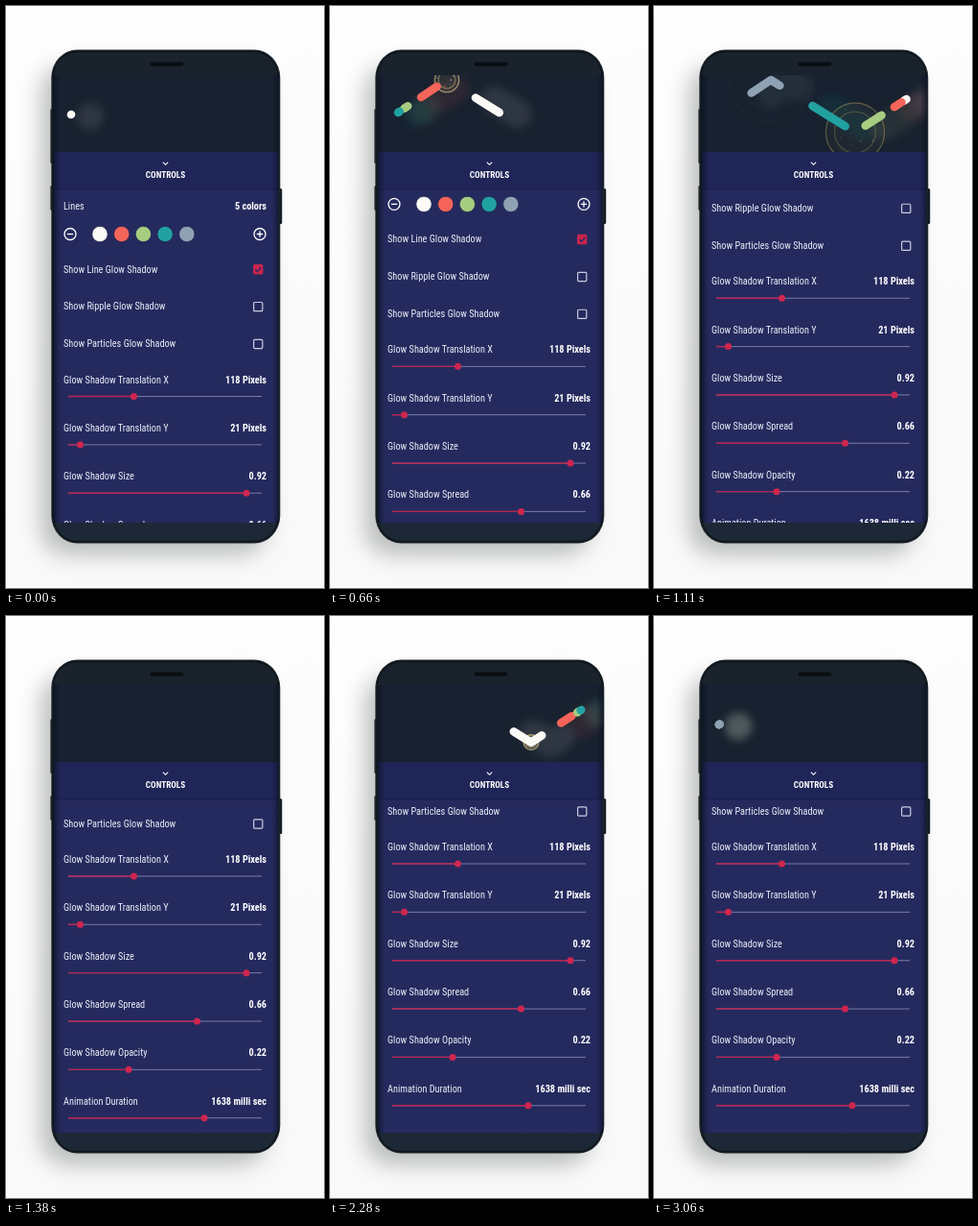
Recreate the animation shown at these times as an HTML page. Size 332 by 606 pixels, loop 3.09 s.

```html
<!DOCTYPE html>
<html lang="en">
<head>
<meta charset="utf-8">
<title>Line animation controls</title>
<style>
  html, body { margin: 0; width: 100%; height: 100%; overflow: hidden; background: #fafbfa; }
  svg { display: block; width: 332px; height: 606px; }
  text {
    font: 400 10.25px "Roboto Condensed", Roboto, sans-serif;
    font-stretch: 75%;
    fill: #eceef8;
  }
  .bold { font-weight: 700; fill: #fff; }
  .wide text { letter-spacing: -.055em; }
</style>
</head>
<body>
<svg id="stage" viewBox="0 0 332 606" xmlns="http://www.w3.org/2000/svg">
  <defs>
    <linearGradient id="wall" x1="0" y1="0" x2=".2" y2="1">
      <stop offset="0" stop-color="#fdfefd"/>
      <stop offset="1" stop-color="#f8f9f8"/>
    </linearGradient>
    <linearGradient id="body" x1="0" y1="0" x2="0" y2="1">
      <stop offset="0" stop-color="#1a232c"/>
      <stop offset=".5" stop-color="#182130"/>
      <stop offset="1" stop-color="#1d2837"/>
    </linearGradient>
    <linearGradient id="edge">
      <stop offset="0" stop-color="#0d1324" stop-opacity=".7"/>
      <stop offset=".03" stop-color="#0d1324" stop-opacity="0"/>
      <stop offset=".97" stop-color="#0d1324" stop-opacity="0"/>
      <stop offset="1" stop-color="#0d1324" stop-opacity=".7"/>
    </linearGradient>
    <filter id="soft" x="-40%" y="-20%" width="180%" height="140%"><feGaussianBlur stdDeviation="11"/></filter>
    <filter id="blur" filterUnits="userSpaceOnUse" x="0" y="30" width="332" height="170"><feGaussianBlur stdDeviation="4.5"/></filter>
    <clipPath id="sky"><rect x="50" y="72" width="235" height="80"/></clipPath>
    <clipPath id="pane"><rect x="50" y="191" width="235" height="347"/></clipPath>
  </defs>

  <rect width="332" height="606" fill="url(#wall)"/>
  <rect x="36" y="62" width="236" height="510" rx="28" fill="#6b706f" opacity=".42" filter="url(#soft)"/>

  <g fill="#151c23">
    <rect x="46.4" y="107" width="4" height="57" rx="1.5"/>
    <rect x="46.4" y="187" width="4" height="26" rx="1.5"/>
    <rect x="284" y="190" width="4.2" height="37" rx="1.5"/>
  </g>
  <rect x="47.3" y="45.5" width="239" height="514" rx="27" ry="29" fill="#222b30"/>
  <rect x="49.2" y="47.4" width="235.2" height="510.2" rx="25" ry="27" fill="url(#body)" stroke="#0f151b" stroke-width="1.6"/>
  <rect x="150.5" y="58.5" width="35" height="4" rx="2" fill="#090d11"/>

  <g clip-path="url(#sky)">
    <rect x="50" y="72" width="235" height="80" fill="#18212f"/>
    <g id="glows" filter="url(#blur)" transform="translate(20 2)" opacity=".95"></g>
    <g id="ripples"></g>
    <g id="lines"></g>
  </g>

  <path d="M50 152H285V532q0 6-6 6H56q-6 0-6-6z" fill="#252a5e"/>
  <g clip-path="url(#pane)"><g id="list"></g></g>
  <rect x="50" y="152" width="235" height="39" fill="#1f2557"/>
  <rect x="50" y="190.5" width="235" height="1" fill="#191e48"/>
  <path d="M163.8 162.6l2.7 2.7 2.7-2.7" fill="none" stroke="#fff" stroke-width="1.1"/>
  <text class="bold" x="166.5" y="179.4" text-anchor="middle" style="font-size:9.2px">CONTROLS</text>
  <rect x="50" y="72" width="235" height="466" fill="url(#edge)"/>
</svg>

<script>
const LOOP = 3090, RETURN = 1690, GONE = 1375;
const COLORS = ['#fbfaf6', '#f4645a', '#a6cd80', '#22a1a1', '#8fa2b3'];
const $ = id => document.getElementById(id);

function add(parent, tag, attrs, text) {
  const el = document.createElementNS('http://www.w3.org/2000/svg', tag);
  set(el, attrs);
  if (text) el.textContent = text;
  parent.append(el);
  return el;
}

function set(el, attrs) { for (const k in attrs) el.setAttribute(k, attrs[k]); }

// Monotone curve through [times, values].
function curve(ts, vs) {
  const d = ts.slice(1).map((t, i) => (vs[i + 1] - vs[i]) / (t - ts[i]));
  const m = ts.map((_, i) => d[i - 1] > 0 && d[i] > 0 ? 2 * d[i - 1] * d[i] / (d[i - 1] + d[i]) : 0);
  return t => {
    if (t <= ts[0]) return vs[0];
    const i = ts.findIndex(x => x >= t) - 1;
    if (i < 0) return vs[vs.length - 1];
    const h = ts[i + 1] - ts[i], u = (t - ts[i]) / h, v = 1 - u;
    return vs[i] * v * v * (1 + 2 * u) + vs[i + 1] * u * u * (3 - 2 * u)
      + h * u * v * (m[i] * v - m[i + 1] * u);
  };
}

// Settings list
const list = $('list');
const label = (s, y) => add(list, 'text', { x: 60, y: y + 3.7 }, s);
const value = (s, y) => add(list, 'text', { x: 272, y: y + 3.7, 'text-anchor': 'end', class: 'bold' }, s);

function roundButton(x, sign) {
  add(list, 'circle', { cx: x, cy: 237.5, r: 6, fill: 'none', stroke: '#fff', 'stroke-width': 1.3 });
  add(list, 'path', { d: `M${x - 3.2} 237.5h6.4` + (sign > 0 ? 'm-3.2-3.2v6.4' : ''), stroke: '#fff', 'stroke-width': 1.3 });
}

function checkbox(s, y, on) {
  label(s, y);
  add(list, 'rect', {
    x: 258.6, y: y - 4.2, width: 9.2, height: 9.2, rx: 1,
    fill: on ? '#c8244f' : 'none', stroke: on ? '#c8244f' : '#c9cce0', 'stroke-width': 1.2
  });
  if (on) add(list, 'path', { d: `M260.4 ${y + .4}l2 2.2 4-4.2`, fill: 'none', stroke: '#252a5e', 'stroke-width': 1.3 });
}

function slider(s, v, y, x) {
  label(s, y);
  value(v, y);
  const ty = y + 17.7;
  add(list, 'path', { d: `M65 ${ty}H267`, stroke: '#777ba6', 'stroke-width': 1 });
  add(list, 'path', { d: `M65 ${ty}H${x}`, stroke: '#b92552', 'stroke-width': 1.4 });
  add(list, 'circle', { cx: x, cy: ty, r: 3.5, fill: '#cf264f' });
}

label('Lines', 208.5);
value('5 colors', 208.5);
roundButton(67, -1);
roundButton(265, 1);
COLORS.forEach((c, i) => add(list, 'circle', {
  cx: 98 + 22.7 * i, cy: 237.5, r: 8.2, fill: c, stroke: '#1b2150', 'stroke-width': .8
}));
checkbox('Show Line Glow Shadow', 273.8, true);
checkbox('Show Ripple Glow Shadow', 312.7, false);
checkbox('Show Particles Glow Shadow', 351.6, false);
[
  ['Glow Shadow Translation X', '118 Pixels', 133.5],
  ['Glow Shadow Translation Y', '21 Pixels', 77.5],
  ['Glow Shadow Size', '0.92', 251],
  ['Glow Shadow Spread', '0.66', 199.5],
  ['Glow Shadow Opacity', '0.22', 128],
  ['Animation Duration', '1638 milli sec', 207]
].forEach(([s, v, x], i) => slider(s, v, 388.8 + 50.35 * i, x));

// Tighten spacing when no condensed face is available.
const probe = add($('stage'), 'text', { y: -50 }, 'Show Particles Glow Shadow');
if (probe.getComputedTextLength() > 125) $('stage').classList.add('wide');
probe.remove();

const scroll = curve([240, 480, 840, 1380, 1650], [0, 9.5, 59.5, 135.5, 148.5]);

// Travelling lines
const POINTS = [[68, 113], [122, 77], [210, 131.6], [263.5, 97]];
const pathOf = pts => 'M' + pts.map(p => p.join(' ')).join('L');
const OUT = pathOf(POINTS), BACK = pathOf([...POINTS].reverse());
const TIMES = [60, 140, 480, 840, 920, 1110, 1330];
const track = (...v) => curve(TIMES, [0, ...v, 231]);
const RUNS = [
  { from: 0, head: track(2.5, 39, 213, 219, 231), tail: track(0, 8, 201, 209, 228) },
  { from: 230, head: track(0, 6, 134, 180, 225), tail: track(0, 0, 101, 162, 216) },
  { from: 420, head: track(0, 0, 53, 108, 200), tail: track(0, 0, 38, 76, 180) },
  { from: 590, head: track(0, 0, 19, 41, 155), tail: track(0, 0, 13, 31, 115) },
  { from: 740, head: track(0, 0, 0, 0, 75), tail: track(0, 0, 0, 0, 40) }
];
const stroke = (parent, color, width, opacity) => add(parent, 'path', {
  fill: 'none', stroke: color, 'stroke-width': width, opacity,
  'stroke-linecap': 'round', 'stroke-linejoin': 'round'
});
RUNS.forEach((r, i) => {
  r.paths = [stroke($('glows'), COLORS[i], 28, .1), stroke($('lines'), COLORS[i], 8.6, 1)];
});

// Ripples at the two corners
const ripples = [550, 740].map((at, i) => {
  const g = add($('ripples'), 'g', {});
  const tint = i ? '#d3b964' : '#b8ab76';
  const disc = add(g, 'circle', { fill: tint, opacity: .12 });
  const rings = [1, .7].map(k => ({
    k, el: add(g, 'circle', { fill: 'none', stroke: tint, 'stroke-width': 1.3, opacity: k })
  }));
  const dots = Array.from({ length: 7 }, (_, n) => ({
    a: n * 2.4 + i, k: .35 + (n * 5 % 7) * .08,
    el: add(g, 'circle', { r: .9, fill: COLORS[n % 5], opacity: .55 })
  }));
  return { at, g, disc, rings, dots };
});

function draw(t) {
  const back = t >= RETURN, p = back ? t - RETURN : t;
  list.setAttribute('transform', `translate(0 ${-scroll(t).toFixed(2)})`);

  for (const r of RUNS) {
    const shown = p >= r.from && p < GONE;
    const tail = Math.min(r.tail(p), 230.5), len = Math.max(.05, r.head(p) - tail);
    for (const el of r.paths) set(el, {
      d: back ? BACK : OUT,
      pathLength: 231,
      'stroke-dasharray': `${len} 600`,
      'stroke-dashoffset': -tail,
      visibility: shown ? 'visible' : 'hidden'
    });
  }

  ripples.forEach(({ at, g, disc, rings, dots }, i) => {
    const age = p - at, r = Math.max(0, 5 + .069 * age);
    const [x, y] = POINTS[(i === 0) === back ? 2 : 1];
    set(g, { transform: `translate(${x} ${y})`, opacity: age < 0 ? 0 : Math.max(0, 1 - age / 580) });
    set(disc, { r });
    rings.forEach(o => set(o.el, { r: r * o.k }));
    dots.forEach(o => set(o.el, { cx: Math.cos(o.a) * r * o.k, cy: Math.sin(o.a) * r * o.k }));
  });
}

const start = performance.now();
function tick() {
  draw((performance.now() - start) % LOOP);
  requestAnimationFrame(tick);
}
tick();
</script>
</body>
</html>
```
